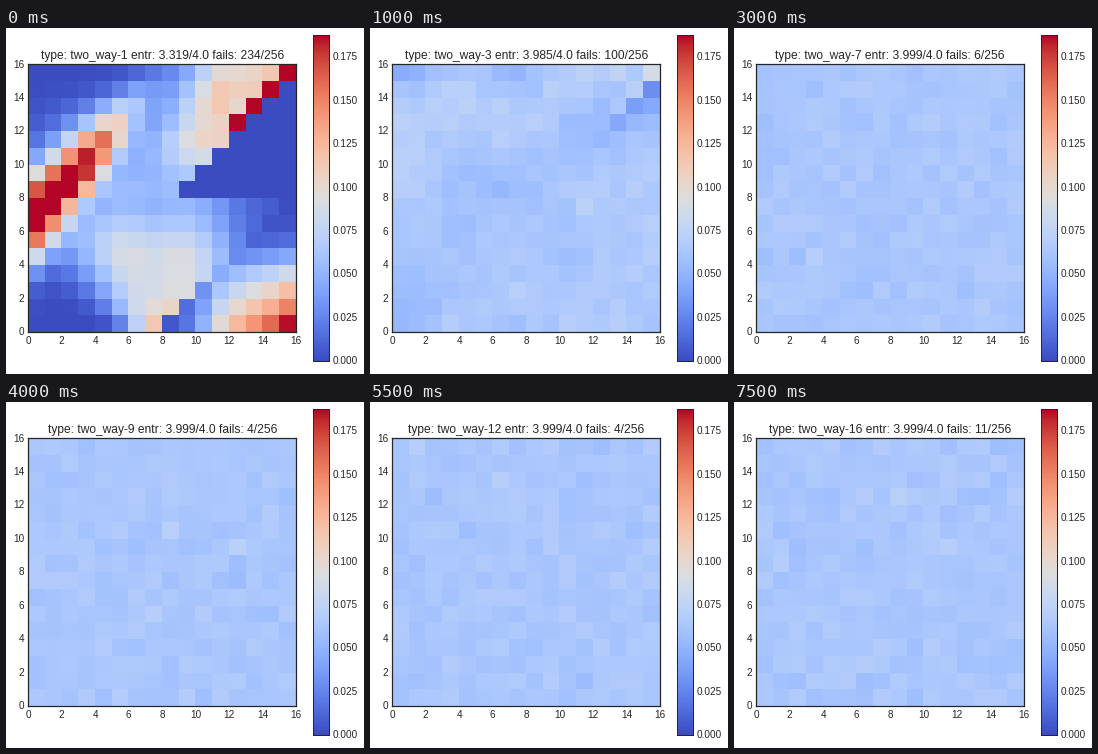
These frames come from a looping animation (358x346 px, 8 s). A matplotlib script:

```python
import numpy as np
import matplotlib.pyplot as plt
from matplotlib.animation import FuncAnimation
from matplotlib.transforms import Affine2D

W, H, N = 358, 346, 16
STEPS, TRIALS, VMAX = 16, 10000, 3 / 16
INK = "0.15"

plt.rcParams.update({
    "font.family": "Liberation Sans",
    "text.color": INK,
    "xtick.color": INK,
    "ytick.color": INK,
    "axes.edgecolor": INK,
})


def sigmoid(x):
    return 1 / (1 + np.exp(-x))


def bell(x, width):
    return np.exp(-(x / width) ** 2)


def transition():
    """Chance that one shuffle moves a card from column to row."""
    r, c = np.mgrid[:N, :N]
    ridge = 0.2 * bell(r - 6.8 - c, 2.6 - 0.2 * c.clip(0, 5)) * sigmoid(5 - c)
    spread = np.where(c < 7.3, np.minimum(1.7 + 0.75 * r, 6), 4.5)
    hump = 0.1 * bell(r, 11) * bell(c - 7.3, spread) * sigmoid((13 - r) / 0.6)
    upper = 0.135 * sigmoid((c - 10 + 0.55 * (15 - r)) / 1.2) * sigmoid((r - 9.7) / 0.7)
    lower = 0.135 * sigmoid((c - 11) / 0.9) * sigmoid((3.2 - r) / 0.8)
    stay = 0.4 * sigmoid((r - 11.3) / 0.4)

    p = np.where(c >= r + 8, lower, hump + ridge + upper)
    p[(c > r) & (r >= 8)] = 0
    p = np.where((c == r) & (r > 10), stay, p)
    for _ in range(6):
        p /= p.sum(axis=0)
        p /= p.sum(axis=1, keepdims=True)
    return p


def shuffled(step):
    """Measured distribution after the given number of shuffles."""
    p = np.linalg.matrix_power(BASE, step)
    if step == 1:
        return p
    rng = np.random.default_rng(step)
    return np.array([rng.multinomial(TRIALS, row / row.sum()) for row in p]) / TRIALS


def caption(step):
    entropy = min(3.999, 4 - 0.681 * 0.148 ** (step - 1))
    fails = np.interp(step, [1, 3, 5, 9, 12, 14, 16], [234, 100, 9, 4, 4, 9, 11])
    return f"type: two_way-{step} entr: {entropy:.3f}/4.0 fails: {fails:.0f}/256"


def add_axes(left, top, right, bottom, line):
    ax = fig.add_axes([left / W, 1 - bottom / H, (right - left) / W, (bottom - top) / H])
    for spine in ax.spines.values():
        spine.set_linewidth(line)
    return ax


def style_ticks(ax, xpad, ypad):
    ax.tick_params(length=0, labelsize=10)
    ax.tick_params(axis="x", pad=xpad)
    ax.tick_params(axis="y", pad=ypad)
    for label in ax.get_yticklabels():
        label.set_transform(label.get_transform() + Affine2D().translate(0, 0.7))


BASE = transition()
GRIDS = [shuffled(k) for k in range(1, STEPS + 1)]

fig = plt.figure(figsize=(W / 72, H / 72), dpi=72, facecolor="white")

ax = add_axes(22.2, 36.2, 290.2, 304, line=1.25)
image = ax.imshow(GRIDS[0], cmap="coolwarm", vmin=0, vmax=VMAX, origin="lower",
                  extent=(0, N, 0, N), aspect="auto", interpolation="nearest")
ax.set_xticks(range(0, N + 1, 2))
ax.set_yticks(range(0, N + 1, 2))
style_ticks(ax, 4, 4)
title = ax.set_title("", fontsize=12, pad=5.7)

bar = add_axes(307, 7.3, 323.3, 333, line=1)
bar.imshow(np.linspace(0, 1, 256)[:, None], cmap="coolwarm", origin="lower",
           extent=(0, 1, 0, VMAX), aspect="auto", interpolation="nearest")
bar.set_xticks([])
bar.yaxis.tick_right()
levels = np.arange(8) * 0.025
bar.set_yticks(levels, [f"{v:.3f}" for v in levels])
style_ticks(bar, 4, 3.5)


def draw(i):
    image.set_data(GRIDS[i])
    title.set_text(caption(i + 1))
    return image, title


anim = FuncAnimation(fig, draw, frames=STEPS, interval=500, repeat=True,
                     repeat_delay=0, init_func=lambda: draw(0), blit=False)
plt.show()
```
